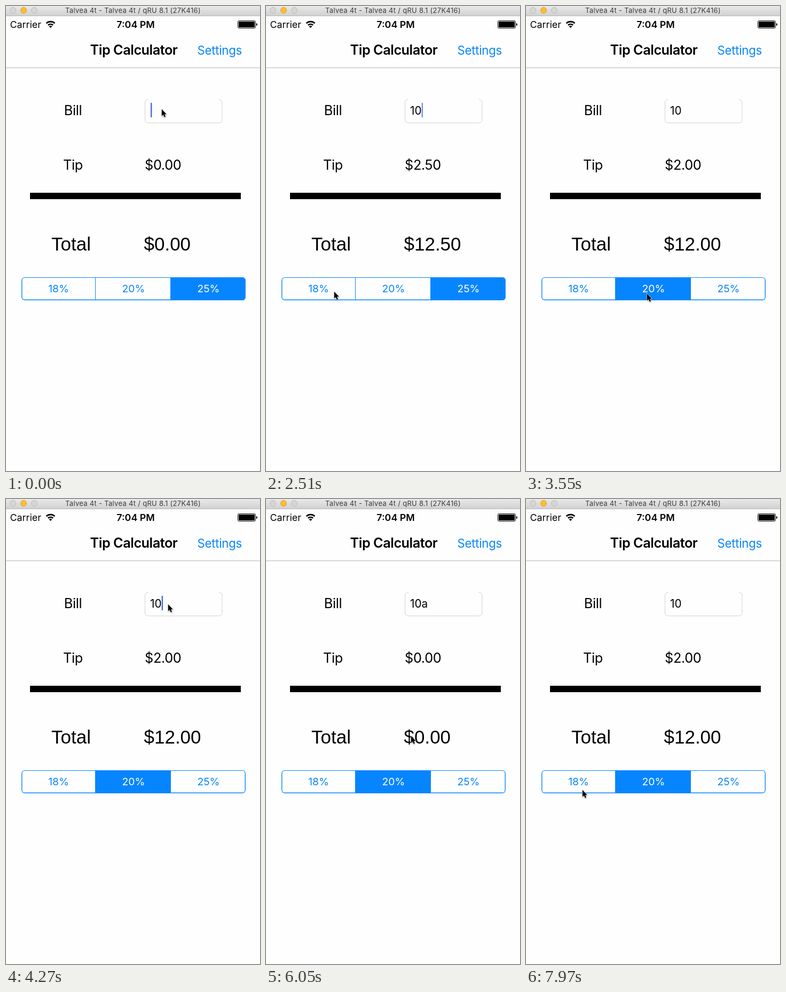
An HTML page that plays this animation: 476 by 869 pixels, repeating every 8000 ms.

```html
<!DOCTYPE html>
<html lang="en">
<head>
<meta charset="utf-8">
<title>Tip Calculator</title>
<style>
  html, body { margin: 0; width: 100%; height: 100%; overflow: hidden; background: #fefefe; }
  svg { display: block; width: 100%; height: 100%; font-family: Inter, "Open Sans", sans-serif; }
  .label { font-size: 25.3px; letter-spacing: -.35px; }
  .total { font: 35px "Liberation Sans", Arial, sans-serif; }
  .small { font-size: 17.85px; }
  .field { font-size: 20.8px; }
  .seg { font-size: 19.3px; text-anchor: middle; }
  .bold { font-weight: 600; }
  .mid { text-anchor: middle; }
</style>
</head>
<body>
<svg viewBox="0 0 476 869">
  <defs>
    <linearGradient id="chrome" x2="0" y2="1">
      <stop stop-color="#e9e9e9"/><stop offset="1" stop-color="#d1d1d1"/>
    </linearGradient>
    <clipPath id="pill"><rect x="29" y="507" width="420" height="43" rx="6"/></clipPath>
  </defs>

  <!-- window bar -->
  <rect width="476" height="18" fill="url(#chrome)"/>
  <rect y="18" width="476" height="1" fill="#b8b8b8"/>
  <g fill="#d6d6d6" stroke="#bababa">
    <circle cx="13" cy="8" r="5.5"/>
    <circle cx="33" cy="8" r="5.5" fill="#fdbd2f" stroke="#dfa125"/>
    <circle cx="53" cy="8" r="5.5"/>
  </g>
  <text class="mid" x="238" y="13" font-size="13" letter-spacing=".3" fill="#3b3b3b">Talvea 4t - Talvea 4t / qRU 8.1 (27K416)</text>

  <!-- status bar -->
  <text class="small" x="7.5" y="41">Carrier</text>
  <g fill="none" stroke="#000" stroke-width="2.6">
    <path d="M75.6 32.2a11.6 11.6 0 0 1 15.8 0M78.8 35.8a7 7 0 0 1 9.4 0"/>
    <path d="M83.5 41l-2.8-2.8a4 4 0 0 1 5.6 0z" fill="#000" stroke="none"/>
  </g>
  <text class="small bold mid" x="243" y="41">7:04 PM</text>
  <rect x="434.5" y="27.5" width="33" height="14" rx="2.5" fill="none" stroke="#000"/>
  <rect x="436" y="29" width="30" height="11" rx="1"/>
  <path d="M469 32q2 0 2 2.5t-2 2.5z"/>

  <!-- navigation bar -->
  <text class="label bold mid" x="239.5" y="91" style="letter-spacing:-.5px">Tip Calculator</text>
  <text x="358.5" y="91" font-size="22.3" letter-spacing="-.3" fill="#0785ff">Settings</text>
  <rect y="115" width="476" height="1" fill="#b4b4b4"/>

  <!-- form -->
  <text class="label" x="108.7" y="204">Bill</text>
  <text class="label" x="107" y="306">Tip</text>
  <text class="total" x="85" y="457">Total</text>
  <path d="M267 174.5q-6.5 0-6.5 6.5V212q0 6.5 6.5 6.5H398.5q6.5 0 6.5-6.5V181q0-6.5-6.5-6.5" fill="none" stroke="#d2d2d2"/>
  <rect x="45" y="349" width="395" height="12"/>
  <rect id="caret" y="181" width="2.5" height="27" fill="#4a70e8"/>
  <text id="bill" class="field" x="270" y="203"></text>
  <text id="tip" class="label" x="260" y="306"></text>
  <text id="total" class="total" x="258.5" y="457" style="font-kerning:none"></text>

  <g clip-path="url(#pill)">
    <g id="segments"></g>
    <rect x="29.7" y="507.3" width="418.6" height="42" rx="5" fill="none" stroke="#0785ff" stroke-width="1.4"/>
  </g>

  <g id="menu">
    <path d="M176 100H409q11 0 11 11V143q0 11-11 11H306L293 167 280 154H176q-11 0-11-11V111q0-11 11-11z" fill="#2e2e2e"/>
    <rect x="277" y="100" width="1" height="54" fill="#f4f4f4"/>
    <g class="field mid" fill="#fff">
      <text x="222.5" y="135">Select</text>
      <text x="350" y="135">Select All</text>
    </g>
  </g>

  <path id="pointer" d="M1 1V15.5L4.3 12.5 6.7 18 9.2 17 6.8 11.7H11.3z" stroke="#fff" stroke-width="1.2"
    paint-order="stroke" style="filter:drop-shadow(0 1px 1px #0006)"/>
</svg>

<script>
const LOOP = 8000, TICK = 147.4;   // the screen refreshes once per tick
const BLINK = 6.24;                // caret period in ticks
const BLUE = '#0785ff', PRESSED = '#cde6ff';
const RATES = [.18, .2, .25];
const $ = id => document.getElementById(id);

// all times are in ticks
const edits = [
  { at: -3, bill: '' }, { at: 6, bill: '1' }, { at: 7, bill: '10' },
  { at: 28, bill: '10' },   // a tap in the field restarts the caret
  { at: 35, bill: '10a' }, { at: 49, bill: '10' },
];
const taps = [{ at: -1, seg: 2 }, { at: 18, seg: 0 }, { at: 23, seg: 1 }];

// places where the pointer rests; bend curves the way there
const rests = [
  { from: 0, to: 10, pos: [291, 192] },
  { from: 17, to: 19, pos: [127, 533], bend: [0, 95] },
  { from: 22, to: 24, pos: [226, 537] },
  { from: 28, to: 35, pos: [303, 196], bend: [55, -105] },
  { from: 40, to: 41, pos: [271, 442] },
  { from: 46, to: 50, pos: [305, 455], bend: [90, 15] },
  { from: 54, to: 55, pos: [105, 543], bend: [0, 165] },
];

$('segments').innerHTML = RATES.map((r, i) =>
  `<rect x="${26.5 + 141 * i}" y="507" width="141" height="43"/>
   <rect x="${26 + 141 * i}" y="507" width="1" height="43" fill="${BLUE}"/>
   <text class="seg" x="${98.5 + 140.5 * i}" y="535">${r * 100}%</text>`).join('');
const cells = [...$('segments').querySelectorAll('rect:nth-child(3n+1)')];
const names = [...$('segments').querySelectorAll('text')];

const clamp = v => Math.max(0, Math.min(1, v));
const latest = (list, n) => list.findLast(e => e.at <= n);
const money = v => '$' + v.toFixed(2);

function pointerAt(n) {
  const i = rests.findIndex(r => n <= r.to);
  const { from, pos, bend = [0, 0] } = rests[i];
  if (n >= from) return pos;
  const prev = rests[i - 1];
  const u = (n - prev.to) / (from - prev.to);
  const ease = u * u * (3 - 2 * u), arc = Math.sin(Math.PI * u);
  return pos.map((p, k) => prev.pos[k] + (p - prev.pos[k]) * ease + bend[k] * arc);
}

function draw(now) {
  const n = Math.floor((now % LOOP + 8) / TICK);
  const { at, bill } = latest(edits, n);
  const press = latest(taps, n).seg, choice = latest(taps, n - 1)?.seg ?? press;
  const amount = Number(bill) || 0;
  const tip = amount * RATES[choice];

  $('bill').textContent = bill;
  $('tip').textContent = money(tip);
  $('total').textContent = money(amount + tip);

  const wave = Math.cos(2 * Math.PI * (n - at - 2.3) / BLINK);
  $('caret').setAttribute('x', bill ? 270 + $('bill').getComputedTextLength() : 271);
  $('caret').setAttribute('opacity', clamp(.5 + 2.5 * wave));
  $('menu').setAttribute('opacity', clamp(Math.min(n - 31, 36 - n) / 2));

  cells.forEach((cell, i) => {
    cell.setAttribute('fill', i === choice ? BLUE : i === press ? PRESSED : '#fefefe');
    names[i].setAttribute('fill', i === choice ? '#fff' : BLUE);
  });
  $('pointer').setAttribute('transform', `translate(${pointerAt(n)}) scale(.87)`);
  requestAnimationFrame(() => draw(performance.now()));
}
draw(0);
</script>
</body>
</html>
```
